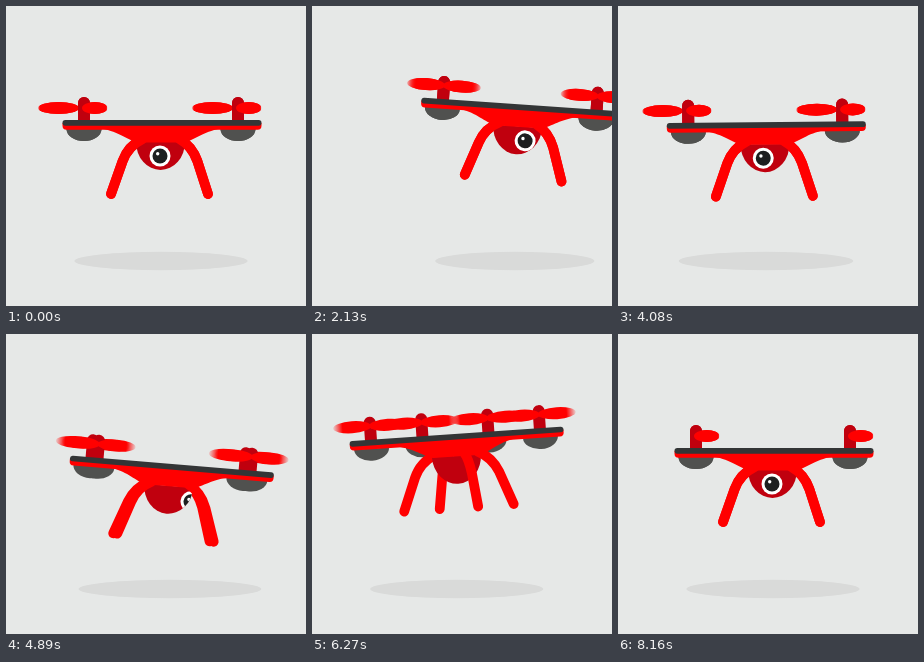
These frames come from a looping animation (300x300 px, 8.19 s). An HTML page with a canvas:

```html
<!DOCTYPE html>
<html lang="en">
<head>
<meta charset="utf-8">
<title>Hovering drone</title>
<style>
  html, body { margin: 0; width: 100%; height: 100%; overflow: hidden; background: #e6e8e7; }
  canvas { display: block; width: 300px; height: 300px; }
</style>
</head>
<body>
<canvas id="stage"></canvas>
<script>
const LOOP = 8190, STEP = 30, FRAMES = LOOP / STEP;
const HOME = { x: 156, y: 118 };
const RED = '#ff0000', DARK_RED = '#c0000e', DECK = '#333536', GREY = '#50514f';

const canvas = document.getElementById('stage');
const ctx = canvas.getContext('2d');
const ratio = window.devicePixelRatio || 1;
canvas.width = canvas.height = 300 * ratio;

const radians = deg => deg * Math.PI / 180;

// Sine ease from 0 to 1 between two times
function ease(t, from, to) {
  const p = Math.min(1, Math.max(0, (t - from) / (to - from)));
  return (1 - Math.cos(Math.PI * p)) / 2;
}

// A value that starts and ends at rest and eases through its turning points
function swing(t, rest, ...turns) {
  let time = 0, value = rest, result = rest;
  for (const [nextTime, next] of [...turns, [LOOP - STEP, rest]]) {
    result += (next - value) * ease(t, time, nextTime);
    time = nextTime;
    value = next;
  }
  return result;
}

// Fly left, right, dip, turn around while rising, come home
function poseAt(t) {
  const x = swing(t, HOME.x, [1250, 107], [2170, 209], [3210, 156], [4200, 148], [5080, 168], [6950, 135], [7600, 157]);
  const y = swing(t, HOME.y, [1500, 105], [2060, 102], [3000, 136], [4150, 120], [4900, 134], [6650, 100], [7550, 131]);
  const tilt = swing(t, 0, [1200, -3.5], [2200, 4.1], [4150, -0.5], [4900, 4.8], [6400, -4.1], [7560, 0.8]);
  return {
    x, y,
    tilt: radians(tilt),
    yaw: radians(180 * ease(t, 4658, 7005)),
    look: radians(0.27 * (x - HOME.x) + 360 * ease(t, 4270, 7170))
  };
}

// Four corners of a rectangle turned around the vertical axis, back to front
function corners(halfWidth, halfDepth, yaw) {
  const c = Math.cos(yaw), s = Math.sin(yaw), list = [];
  for (const sx of [-1, 1]) for (const sz of [-1, 1]) {
    const x = sx * halfWidth, z = sz * halfDepth;
    list.push({ x: x * c + z * s, z: z * c - x * s });
  }
  return list.sort((a, b) => a.z - b.z);
}

function ellipse(x, y, rx, ry, fill, end = Math.PI * 2) {
  ctx.beginPath();
  ctx.ellipse(x, y, rx, ry, 0, 0, end);
  ctx.fillStyle = fill;
  ctx.fill();
}

function box(x, y, w, h, radii, fill) {
  ctx.beginPath();
  ctx.roundRect(x, y, w, h, radii);
  ctx.fillStyle = fill;
  ctx.fill();
}

// A blade reaching from x0 to x1 with a soft outer tip
function blade(x0, x1, y, blur) {
  const g = ctx.createLinearGradient(x0, 0, x1, 0);
  g.addColorStop(0, RED);
  g.addColorStop(1 - blur, RED);
  g.addColorStop(1, 'rgba(255,0,0,0.1)');
  ellipse((x0 + x1) / 2, y, Math.abs(x1 - x0) / 2, 6, g);
}

// Odd frames show both blades spread; even frames one behind, one in front
function rotor(x, frame) {
  const stub = () => box(-6, -27, 12, 25, [6, 6, 0, 0], DARK_RED);
  ctx.save();
  ctx.translate(x, 0);
  if (frame % 2) {
    stub();
    blade(1, -37, -17.7, 0.25);
    blade(-1, 37, -17.7, 0.25);
  } else {
    const side = frame % 4 ? -1 : 1;
    if (frame < FRAMES - 1) blade(-5 * side, -46 * side, -16, 0.06);
    stub();
    blade(-2 * side, 23.5 * side, -16, 0.06);
  }
  ctx.restore();
}

function motor(hub) {
  ellipse(hub.x - 1, 5, 17.5, 12, GREY, Math.PI);
}

function leg({ x }) {
  ctx.beginPath();
  ctx.moveTo(x * 0.38 - 1, 15);
  ctx.quadraticCurveTo(x * 0.66 - 2, 22, x * 0.77 - 2, 37);
  ctx.lineTo(x - 2.5, 70);
  ctx.strokeStyle = RED;
  ctx.lineWidth = 9.8;
  ctx.lineCap = ctx.lineJoin = 'round';
  ctx.stroke();
}

function camera(look) {
  ctx.save();
  ellipse(-1.5, 18, 24.5, 28, DARK_RED, Math.PI);
  ctx.clip();
  if (Math.cos(look) > 0) {
    const x = -2 + 36 * Math.sin(look);
    ellipse(x, 32, 10.5, 10.5, '#ffffff');
    ellipse(x, 32, 7.5, 7.5, '#1d1f20');
    ellipse(x - 2.3, 29.8, 1.7, 1.7, '#ffffff');
  }
  ctx.restore();
}

function body() {
  ctx.beginPath();
  ctx.moveTo(-64, 4);
  ctx.bezierCurveTo(-44, 7, -38, 14, -25, 18.5);
  ctx.lineTo(23, 18.5);
  ctx.bezierCurveTo(36, 14, 42, 7, 62, 4);
  ctx.fillStyle = RED;
  ctx.fill();
}

function deck(half) {
  box(-half, -1, half * 2, 6.7, [0, 0, 4, 4], RED);
  box(-half, -4, half * 2, 5.7, 3, DECK);
}

// The shadow follows the drone and shrinks as it rises
function shadow(x, y, half) {
  const drop = y - HOME.y;
  const rx = (87 + 0.3 * drop - 0.01 * drop * drop) * half / 100;
  ellipse(155 + (x - HOME.x) * 0.91, 255, rx, 9.2, '#d9dad9');
}

function draw(t) {
  const frame = Math.round(t / STEP);
  const { x, y, tilt, yaw, look } = poseAt(t);
  const hubs = corners(77, 40, yaw), legs = corners(48.5, 27.6, yaw);
  const half = Math.max(...hubs.map(h => Math.abs(h.x))) + 22.5;

  ctx.setTransform(ratio, 0, 0, ratio, 0, 0);
  ctx.fillStyle = '#e6e8e7';
  ctx.fillRect(0, 0, 300, 300);
  shadow(x, y, half);

  ctx.translate(x, y);
  ctx.rotate(tilt);
  hubs.forEach(motor);
  legs.slice(0, 2).forEach(leg);
  camera(look);
  body();
  legs.slice(2).forEach(leg);
  hubs.forEach(h => rotor(h.x - 1, frame));
  deck(half);
}

const start = performance.now();
function tick() {
  const t = (performance.now() - start) % LOOP;
  draw(Math.floor(t / STEP) * STEP);
  requestAnimationFrame(tick);
}
tick();
</script>
</body>
</html>
```
